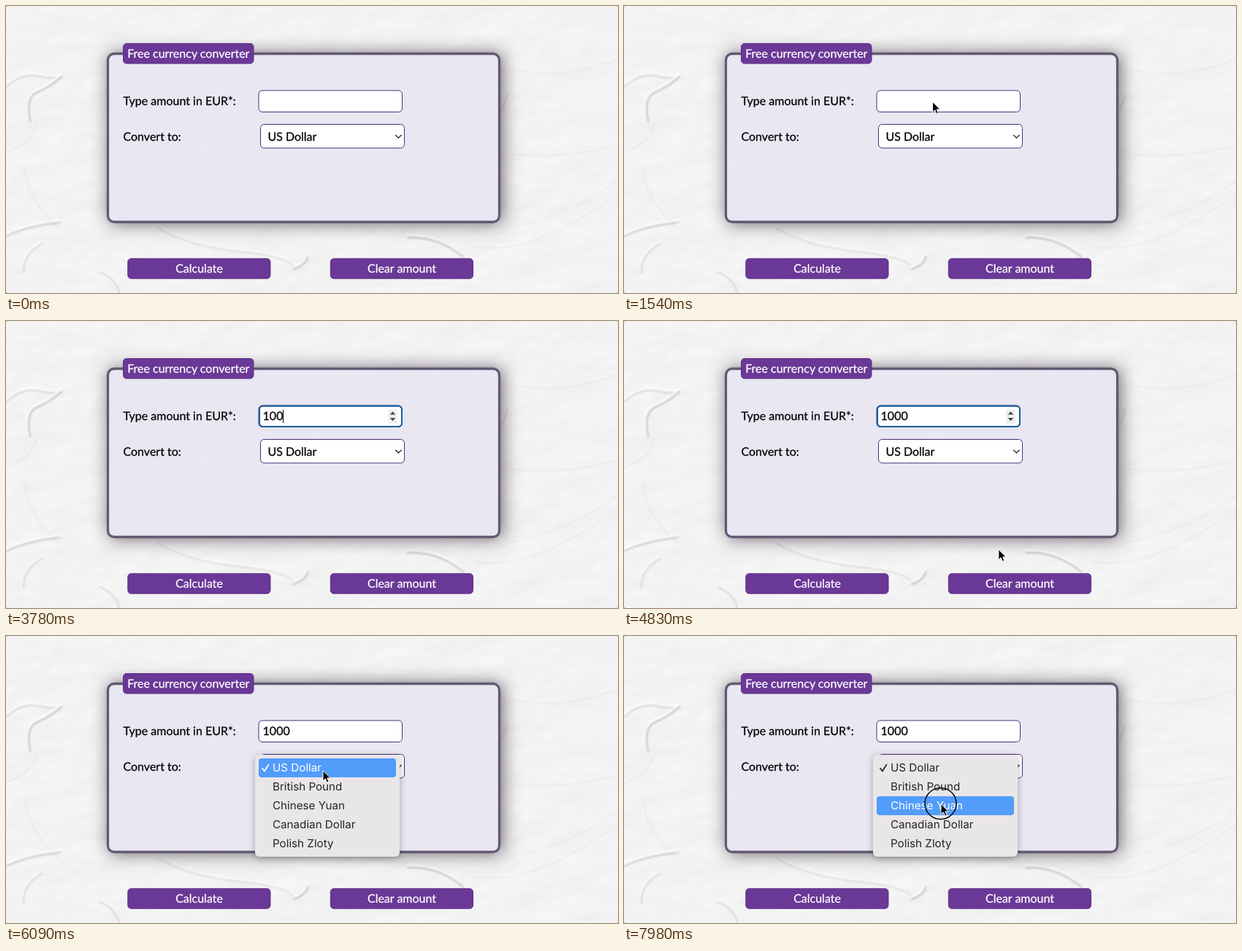
An HTML page for the animation above (8000 ms loop, 838x394 px).

```html
<!DOCTYPE html>
<html lang="en">
<head>
<meta charset="utf-8">
<title>Currency converter</title>
<style>
  html, body { margin: 0; width: 100%; height: 100%; overflow: hidden; background: #999; }
  #stage { position: absolute; left: 0; top: 0; width: 838px; height: 394px; overflow: hidden; border-radius: 3px; background: #f3f3f3; }
  #stage > svg { position: absolute; left: 0; top: 0; }
  #panel {
    position: absolute; left: 138px; top: 64px; width: 539px; height: 234px;
    border-radius: 10px; background: rgba(231, 230, 242, .9);
    box-shadow: 3px 1px 23px rgba(66, 52, 66, .75);
  }
  text { font: 16px Lato, sans-serif; fill: #000; stroke: #000; stroke-width: .25; white-space: pre; text-rendering: geometricPrecision; }
  .light text { fill: #fff; stroke: #fff; }
  .mid { text-anchor: middle; }
  .hint text { font: 13px Inter, sans-serif; fill: #222; stroke: none; }
  .menu text { font: 15.2px Inter, sans-serif; fill: #242324; stroke: none; }
  .menu text.on { fill: #fff; }
  .menu { filter: drop-shadow(0 2px 5px rgba(0, 0, 0, .3)); }
  .hint { filter: drop-shadow(0 1px 2px rgba(0, 0, 0, .16)); }
  .field { fill: #fff; stroke: #4f2b7a; }
</style>
</head>
<body>
<div id="stage">
  <svg width="838" height="394">
    <defs>
      <filter id="plaster" x="0" y="0" width="100%" height="100%" color-interpolation-filters="sRGB">
        <feTurbulence type="fractalNoise" baseFrequency=".014 .022" numOctaves="3" seed="8"/>
        <feDiffuseLighting surfaceScale=".5" diffuseConstant="1.1" lighting-color="#fff">
          <feDistantLight azimuth="235" elevation="60"/>
        </feDiffuseLighting>
      </filter>
      <filter id="soft" x="-5%" y="-5%" width="110%" height="110%"><feGaussianBlur stdDeviation=".9"/></filter>
    </defs>
    <rect width="838" height="394" filter="url(#plaster)"/>
    <g id="ridges" fill="none" stroke-linecap="round" filter="url(#soft)"></g>
  </svg>
  <div id="panel"></div>
  <svg width="838" height="394">
    <rect x="139.5" y="65.5" width="536" height="231" rx="8.5" fill="none" stroke="#625a72" stroke-width="3.3"/>
    <g fill="#6a3896" stroke="#5f3189">
      <rect x="160.5" y="51.5" width="178.5" height="27.5" rx="4.5"/>
      <rect x="166.8" y="346.8" width="195.2" height="27.4" rx="4.5"/>
      <rect x="444.3" y="346.8" width="195.2" height="27.4" rx="4.5"/>
    </g>
    <g class="light mid">
      <text x="249.8" y="71">Free currency converter</text>
      <text x="264.5" y="366">Calculate</text>
      <text x="542" y="366">Clear amount</text>
    </g>
    <text x="160.5" y="136">Type amount in EUR*:</text>
    <text x="160.5" y="185">Convert to:</text>

    <rect id="input" class="field" x="346" y="116" width="196.5" height="29.5" rx="5"/>
    <rect id="focus" x="347" y="116.8" width="195" height="28.2" rx="5" fill="#fff" stroke="#0f5f9c" stroke-width="2"/>
    <g id="spin">
      <rect x="523" y="121" width="13" height="20" rx="2.5" fill="#efefef"/>
      <path d="M525.7 128.5l3.8-4.3 3.8 4.3zM525.7 133l3.8 4.3 3.8-4.3z" fill="#484848"/>
    </g>
    <text id="amount" x="351.6" y="136"></text>
    <rect id="caret" y="122" width="1" height="18"/>

    <rect class="field" x="348.5" y="162.5" width="197" height="32.5" rx="5"/>
    <text x="358.4" y="185">US Dollar</text>
    <path d="M533.2 177l4.2 4.2 4.2-4.2" fill="none" stroke="#222" stroke-width="1.3"/>

    <g id="hint" class="hint">
      <path d="M428 155H437L444.5 148L452 155H478Q483 155 483 160V231Q483 236 478 236H428Q423 236 423 231V160Q423 155 428 155Z" fill="#fff"/>
      <text x="435" y="182.3">1</text>
      <text x="435" y="218.3">90</text>
    </g>

    <g id="menu" class="menu">
      <rect x="341" y="163" width="198" height="140" rx="6" fill="#e9e6e8"/>
      <rect id="bar" x="346" width="188" height="26" rx="4" fill="#529cfa"/>
      <path id="check" d="M350.8 181.6l3 3.9 5.6-8.8" fill="none" stroke-width="1.7" stroke-linecap="round"/>
      <g id="items"></g>
    </g>

    <circle id="click" r="21.5" fill="none" stroke="#000" stroke-width="1.4"/>
    <path id="arrow" d="M.5 .5V14.9L3.8 11.8L6 17L8.5 16L6.3 10.9H10.8Z" stroke="#fff" stroke-width="1"/>
    <g id="beam" fill="none">
      <path d="M-3.2 -8Q0 -8 0 -5.6Q0 -8 3.2 -8M0 -6V6M-3.2 8Q0 8 0 5.6Q0 8 3.2 8M-1.8 1.5H1.8" stroke="#fff" stroke-width="2.6"/>
      <path d="M-3.2 -8Q0 -8 0 -5.6Q0 -8 3.2 -8M0 -6V6M-3.2 8Q0 8 0 5.6Q0 8 3.2 8M-1.8 1.5H1.8" stroke="#000" stroke-width="1.1"/>
    </g>
  </svg>
</div>
<script>
const LOOP = 8000, STEP = 70, ROW = 26, ROW_TOP = 168;
const $ = id => document.getElementById(id);
const NS = 'http://www.w3.org/2000/svg';
const add = (parent, tag, attrs, text = '') => {
  const el = document.createElementNS(NS, tag);
  for (const k in attrs) el.setAttribute(k, attrs[k]);
  el.textContent = text;
  return parent.appendChild(el);
};

// Plaster relief: each ridge is a warm shadow with a white edge above it.
const ridges = [
  ['M0 111Q22 91 45 96T76 96', 2, .3], ['M76 97Q60 111 43 118T33 158', 2.5, .4],
  ['M0 201Q35 188 41 162', 1.5, .12], ['M25 222Q30 268 72 303', 1.5, .15],
  ['M0 316Q28 302 74 297', 2.5, .35], ['M49 326Q22 342 24 366', 2, .3],
  ['M128 365Q150 373 155 394', 2, .3], ['M208 304Q247 329 320 337T394 360', 2, .25],
  ['M394 361Q411 355 413 344', 2.5, .4], ['M550 318Q590 315 626 344', 2.5, .4],
  ['M640 329Q715 346 838 258', 1.5, .12], ['M690 303Q770 288 838 239', 1.5, .1],
  ['M688 85Q757 104 838 72', 1.5, .1], ['M690 203Q770 210 838 190', 1.5, .1],
  ['M430 260Q500 232 590 199T686 120', 2, .25]
];
for (const [d, width, opacity] of ridges) {
  add($('ridges'), 'path', { d, stroke: '#fff', opacity: opacity * 2.2, 'stroke-width': width + 1, transform: 'translate(-1 -2.2)' });
  add($('ridges'), 'path', { d, stroke: '#85746f', opacity, 'stroke-width': width });
}

const items = ['US Dollar', 'British Pound', 'Chinese Yuan', 'Canadian Dollar', 'Polish Zloty']
  .map((name, i) => add($('items'), 'text', { x: 365, y: 186 + i * ROW }, name));

const clamp = v => Math.max(0, Math.min(1, v));
const mix = (a, b, p) => a + (b - a) * p;
const easeOut = p => 1 - (1 - p) ** 2;
const easeInOut = p => p * p * (3 - 2 * p);
const linear = p => p;

// start, end, from x/y, to x/y, easing
const moves = [
  [280, 840, 411, 400, 427, 131, easeOut],
  [1190, 1330, 427, 131, 422, 131, linear],
  [1890, 2100, 422, 131, 403, 131, linear],
  [4620, 5390, 530, 344, 433.5, 174.5, easeInOut],
  [5880, 6440, 433.5, 174.5, 433.5, 205, easeInOut],
  [6580, 7000, 433.5, 205, 433.5, 230, linear]
];
function pointer(t) {
  const [start, end, x0, y0, x1, y1, ease] = moves.filter(m => t >= m[0]).pop() || moves[0];
  const p = ease(clamp((t - start) / (end - start)));
  return [mix(x0, x1, p), mix(y0, y1, p)];
}

const show = (id, on) => $(id).setAttribute('visibility', on ? 'visible' : 'hidden');
const place = (id, x, y) => $(id).setAttribute('transform', `translate(${x} ${y})`);

function draw(time) {
  const t = Math.floor(time / STEP) * STEP;
  const within = (a, b) => t >= a && t < b;
  const [x, y] = pointer(t);

  const digits = [3220, 3570, 3780, 4130].filter(at => t >= at).length;
  $('amount').textContent = '1000'.slice(0, digits);
  $('caret').setAttribute('x', 351.2 + digits * 9.28);
  show('caret', within(2450, 3010) || within(3220, 4620) || within(5110, 5530));
  show('focus', within(2450, 5530));
  show('spin', within(1960, 5530));
  show('hint', within(2520, 3220));

  const open = t >= 5530;
  const row = Math.floor((y - ROW_TOP) / ROW);
  show('menu', open);
  if (open) {
    $('bar').setAttribute('y', ROW_TOP + row * ROW);
    $('check').setAttribute('stroke', row === 0 ? '#fff' : '#242324');
    items.forEach((el, i) => el.setAttribute('class', i === row ? 'on' : ''));
  }

  show('arrow', within(350, 2030) || t >= 4620);
  show('beam', within(2030, 3220));
  show('click', within(1470, 1540) || within(5460, 5530) || t >= 7980);
  place('arrow', x, y);
  place('beam', x, 130.5);
  place('click', x, y);
}

const begin = performance.now();
function tick() {
  draw((performance.now() - begin) % LOOP);
  requestAnimationFrame(tick);
}
tick();
</script>
</body>
</html>
```
